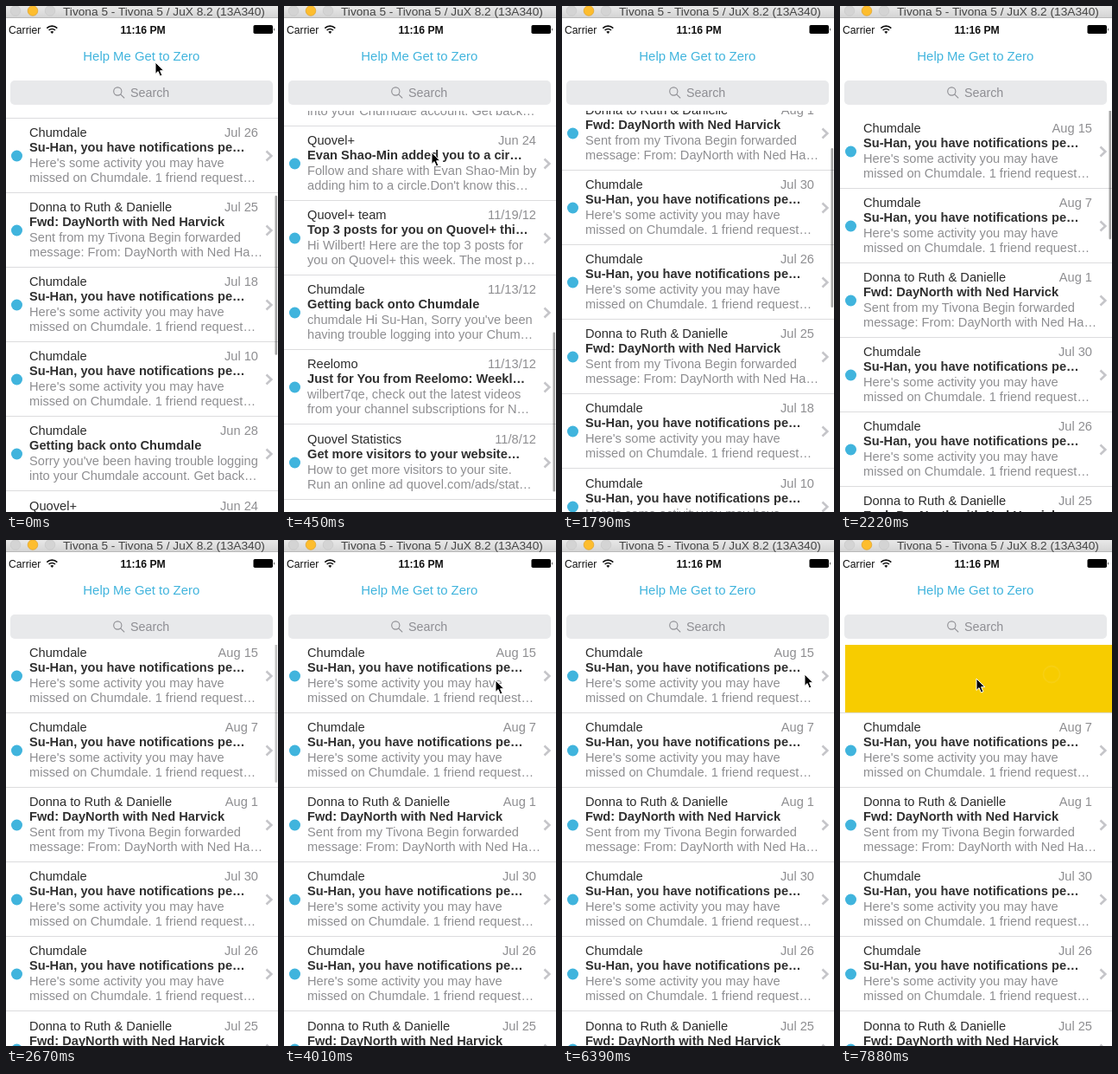
Animation, 315 px wide and 584 px high, one loop 8000 ms. Source, as an HTML page:

```html
<!DOCTYPE html>
<html lang="en">
<head>
<meta charset="utf-8">
<title>Inbox</title>
<style>
html, body { margin: 0; width: 100%; height: 100%; overflow: hidden; background: #fff; }
svg { display: block; width: 315px; height: 584px; font: 14.65px "Liberation Sans", Arial, sans-serif; }
.name { fill: #2c2c2c; }
.title { fill: #303030; font-weight: bold; }
.dim { fill: #8e8e91; }
.blue, .title.blue { fill: #40b4dd; }
.date { text-anchor: end; }
.line { fill: #dcdcde; }
</style>
</head>
<body>
<svg viewBox="0 0 315 584">
  <defs>
    <clipPath id="listArea"><rect y="121" width="315" height="463"/></clipPath>
    <linearGradient id="bar" x2="0" y2="1"><stop stop-color="#e8e8e8"/><stop offset="1" stop-color="#d3d3d3"/></linearGradient>
  </defs>
  <rect width="315" height="584" fill="#fff"/>

  <g clip-path="url(#listArea)">
    <g id="list"></g>
    <rect id="thumb" x="311.5" width="2.6" rx="1.3" fill="#000" fill-opacity=".36"/>
  </g>

  <rect width="315" height="14" fill="url(#bar)"/>
  <rect y="13" width="315" height="1" fill="#b9b9b9"/>
  <g stroke-width=".7">
    <circle cx="11" cy="5.5" r="5.8" fill="#d4d4d4" stroke="#c8c8c8"/>
    <circle cx="31" cy="5.5" r="5.8" fill="#fdbd2e" stroke="#dfa023"/>
    <circle cx="51" cy="5.5" r="5.8" fill="#d4d4d4" stroke="#c8c8c8"/>
  </g>
  <text x="66" y="11" font-size="13.7" fill="#444">Tivona 5 - Tivona 5 / JuX 8.2 (13A340)</text>

  <text x="3" y="32" font-size="12.2" fill="#111">Carrier</text>
  <g fill="none" stroke="#111" stroke-width="1.7">
    <path d="M47.3 25.6a8.6 8.6 0 0 1 12 0M49.6 28a5.4 5.4 0 0 1 7.4 0"/>
    <path d="M53.3 32l-2-2.2a3 3 0 0 1 4 0z" fill="#111" stroke="none"/>
  </g>
  <text x="158.7" y="32" font-size="12.2" font-weight="bold" text-anchor="middle" fill="#111">11:16 PM</text>
  <rect x="286.5" y="22" width="22.5" height="10" rx="1.8"/>
  <path d="M310 25.3q1.7 1.7 0 3.6z"/>

  <text class="blue" x="156.8" y="63" font-size="14.9" text-anchor="middle">Help Me Get to Zero</text>
  <rect x="5" y="86" width="304" height="28" rx="5" fill="#e8e9eb"/>
  <g fill="none" stroke="#8e8e93" stroke-width="1.1">
    <circle cx="129.3" cy="98.5" r="4.6"/><path d="M132.6 101.8l4.6 4.6"/>
  </g>
  <text x="144" y="105" font-size="14.3" fill="#8e8e93">Search</text>

  <path id="cursor" d="M0 0V13.5L3.1 10.6L5.4 16L7.9 15L5.6 9.7H9.8Z" fill="#000" stroke="#fff"/>
</svg>
<script>
const $ = id => document.getElementById(id);
const ROW = 86.1, TOP = 113, TICK = 148.67, LOOP = 8000;

const notice = date => ['Chumdale', date, 'Su-Han, you have notifications pe…',
  "Here's some activity you may have", 'missed on Chumdale. 1 friend request…'];
const forward = date => ['Donna to Ruth & Danielle', date, 'Fwd: DayNorth with Ned Harvick',
  'Sent from my Tivona Begin forwarded', 'message: From: DayNorth with Ned Ha…'];

const mails = [
  notice('Aug 15'), notice('Aug 7'), forward('Aug 1'), notice('Jul 30'), notice('Jul 26'),
  forward('Jul 25'), notice('Jul 18'), notice('Jul 10'),
  ['Chumdale', 'Jun 28', 'Getting back onto Chumdale',
    "Sorry you've been having trouble logging", 'into your Chumdale account. Get back…'],
  ['Quovel+', 'Jun 24', 'Evan Shao-Min added you to a cir…',
    'Follow and share with Evan Shao-Min by', "adding him to a circle.Don't know this…"],
  ['Quovel+ team', '11/19/12', 'Top 3 posts for you on Quovel+ thi…',
    'Hi Wilbert! Here are the top 3 posts for', 'you on Quovel+ this week. The most p…'],
  ['Chumdale', '11/13/12', 'Getting back onto Chumdale',
    "chumdale Hi Su-Han, Sorry you've been", 'having trouble logging into your Chum…'],
  ['Reelomo', '11/13/12', 'Just for You from Reelomo: Weekl…',
    'wilbert7qe, check out the latest videos', 'from your channel subscriptions for N…'],
  ['Quovel Statistics', '11/8/12', 'Get more visitors to your website…',
    'How to get more visitors to your site.', 'Run an online ad quovel.com/ads/stat…']
];

const text = (cls, x, y, s) => `<text class="${cls}" x="${x}" y="${y}">${s.replace('&', '&amp;')}</text>`;

const mailRow = ([name, date, title, a, b], i) => `
  <g id="row${i}">
    ${i ? '' : `<rect id="back" width="315" height="86"/>
    <circle id="icon" cy="42" r="9.5" fill="none" stroke="#fff" stroke-width="1.8"/>`}
    <g id="front${i}">
      <rect width="315" height="86" fill="#fff"/>
      ${text('name', 27, 22, name)}${text('dim date', 292, 22, date)}${text('title', 27, 39, title)}
      ${text('dim', 27, 57, a)}${text('dim', 27, 74, b)}
      <circle class="blue" cx="12.5" cy="44" r="6.5"/>
      <path d="M301.5 38.5L307.3 44L301.5 49.5" fill="none" stroke="#c5c5c9" stroke-width="2.6"/>
    </g>
    <rect class="line" y="86" width="315" height="1"/>
  </g>`;

const footer = `<g id="row${mails.length}">
  ${text('title blue', 27, 40, 'Load More Messages...')}
  ${text('dim', 27, 59, 'About 370 conversations total')}</g>`;

// Later rows go underneath, so each separator stays visible.
$('list').innerHTML = footer + mails.map(mailRow).reverse().join('');

const set = (id, attrs) => Object.entries(attrs).forEach(([k, v]) => $(id).setAttribute(k, v));
const move = (id, x, y) => set(id, { transform: `translate(${Math.round(x)} ${Math.round(y)})` });

function draw(now) {
  // The screen refreshes once per tick.
  const k = Math.floor((now % LOOP + 12) / TICK);
  // Progress 0..1 between two ticks, slowing down when power > 1.
  const go = (from, to, power = 1) => 1 - (1 - Math.min(1, Math.max(0, (k - from) / (to - from)))) ** power;

  // Flick to the bottom, flick back past the top, bounce.
  const y = 328.4 + 481.6 * go(0, 6, 3) - 820.6 * go(9, 15, 2.09) + 10.6 * go(15, 17);

  // A short drag that springs back, then one that carries the row away.
  const drag1 = 55 * go(27, 30) + 66 * go(32, 37), drag2 = 123 * go(46, 51);
  const swipe = 121 * go(37, 40, 2) - drag1 - drag2 - 186 * go(51, 53);

  const px = 173 - 5 * go(0, 6) + 94 * go(12, 20) - 17 * go(21, 25) - drag1 + 157 * go(41, 43) - drag2;
  const py = 65 + 207 * go(0, 6) + 350 * go(9, 12) - 349 * go(18, 20) - 111 * go(21, 25)
    - 7 * go(41, 43) + 5 * go(46, 51);

  for (let i = 0; i <= mails.length; i++) move('row' + i, 0, TOP + i * ROW - y);
  set('thumb', {
    y: 96 + 0.374 * Math.max(y, 0), height: 184 + Math.min(y, 0),
    opacity: 1 - go(6, 8) + go(9, 10) - go(17, 20)
  });
  move('front0', swipe, 0);
  set('back', { fill: swipe > -60 ? '#e3e3e3' : '#f7cc00' });
  set('icon', {
    cx: Math.max(245, Math.min(290, 345 + swipe)),
    opacity: Math.min(1, -swipe / 60) * (1 - 0.93 * go(51, 53))
  });
  move('cursor', px, py);
  requestAnimationFrame(draw);
}
requestAnimationFrame(draw);
</script>
</body>
</html>
```
